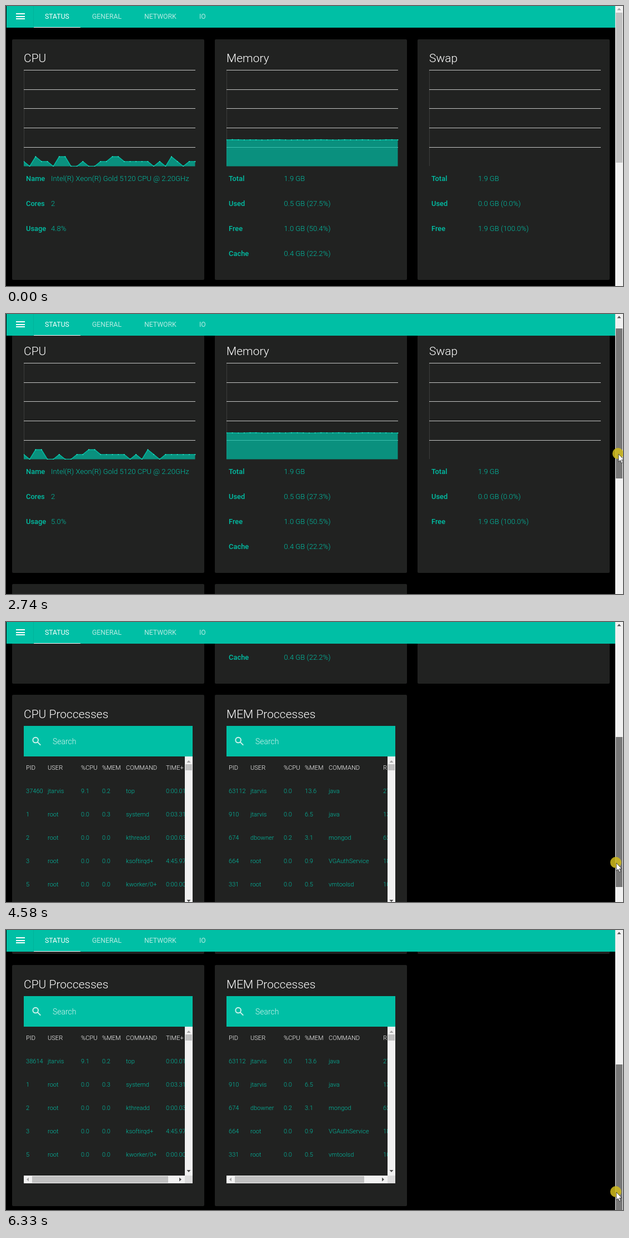
An HTML page that plays this animation: 1111x504 px, repeating every 8000 ms.

```html
<!DOCTYPE html>
<html lang="en">
<head>
<meta charset="utf-8">
<title>Server status</title>
<style>
  html, body { margin: 0; width: 100%; height: 100%; overflow: hidden; background: #000; }
  #stage { position: relative; width: 1111px; height: 504px; overflow: hidden; background: #000;
    font: 300 13.1px/20px Roboto, sans-serif; color: #00bfa5; }
  #stage div, #stage svg, .t { position: absolute; }
  .t { white-space: pre; }
  #page { left: 0; top: 0; width: 1096px; height: 960px; }
  .card { width: 345.5px; height: 433.5px; background: #212221; border-radius: 2px; }
  .title { font-size: 21px; color: #fff; }
  .label { font-weight: 500; font-size: 12.9px; }
  .table { overflow: hidden; font-size: 11.1px; }
  .head { color: #fff; }
  .search { width: 304px; height: 55.5px; background: #00bfa5; }
  .hint { font-size: 14px; color: #d3f3ee; }
  .track { background: #f1f1f1; }
  .thumb { background: #c1c1c1; }
  .grid { stroke: #c4c5c4; shape-rendering: crispEdges; }
  .axis { stroke: #3c3d3c; shape-rendering: crispEdges; }
  .area { fill: #00bfa5; fill-opacity: .7; }
  .line { fill: none; stroke: #00bfa5; stroke-width: 1.4; }
  .dots { fill: none; stroke: #2fdcc0; stroke-width: 2; stroke-linecap: round; }
  #nav { left: 1px; top: 0; width: 1095.5px; height: 39px; background: #00bfa5; }
  #nav .t { font-size: 12.25px; font-weight: 400; color: #b5ebe3; }
  #nav .on { color: #fff; }
  #nav div { background: #fff; }
  #nav .edge { left: 48px; top: 0; width: 1px; height: 39px; background: #00b29a; }
  #bar { left: 1096.5px; top: 0; width: 14.5px; height: 504px; }
  #thumb { left: 1px; width: 12.5px; height: 270px; top: 12px; }
  #halo { width: 20px; height: 20px; margin: -10px; border-radius: 50%; background: rgba(205, 184, 28, .88); }
</style>
</head>
<body>
<div id="stage">
  <div id="page"></div>
  <div id="nav"></div>
  <div id="bar" class="track">
    <div id="thumb"></div>
    <svg width="14" height="12"><path id="up" d="M3.5 7.5 7 3.5 10.5 7.5z"/></svg>
  </div>
  <div id="halo"></div>
  <svg id="cursor" width="14" height="20" viewBox="-1 -1 14 20">
    <path d="M0 0V14L3.2 11.2 5.5 16.4 7.9 15.4 5.6 10.3H9.8Z" fill="#fff" stroke="#111" stroke-width=".7"/>
  </svg>
</div>
<script>
const LOOP = 8000, FIRST = 180, PERIOD = 683.3, LAST = 9;
const POINTS = 30, STEP = 308.5 / (POINTS - 1), BASE = 174.5, SCALE = 1.735;
const THUMB_RATIO = .5106;
const $ = id => document.getElementById(id);

const text = (x, y, s, cls = '', id = '') =>
  `<span class="t ${cls}" ${id && `id="${id}"`} style="left:${x}px;top:${y - 10}px">${s}</span>`;
const box = (x, y, w, h, cls, inner = '') =>
  `<div class="${cls}" style="left:${x}px;top:${y}px;width:${w}px;height:${h}px">${inner}</div>`;
const arrow = (x, y, turn, color) =>
  `<svg width="8" height="8" viewBox="-4 -4 8 8" style="left:${x - 4}px;top:${y - 4}px">
    <path d="M-3.5 2 0-2 3.5 2z" fill="${color}" transform="rotate(${turn})"/></svg>`;

function chart(x, id) {
  let grid = '';
  for (let i = 0; i < 5; i++) {
    const y = Math.round(i * 34.7) + 1.5;
    grid += `<path class="grid" d="M0 ${y}H308.5"/>`;
  }
  return `<svg width="310" height="175" style="left:${x}px;top:114px">
    <path class="axis" d="M.5 1V174"/>${grid}
    <path class="area" id="${id}Area"/><path class="line" id="${id}Line"/><path class="dots" id="${id}Dots"/></svg>`;
}

function statCard(i, title, id, valueX, rows) {
  const x = 32 + 365 * i;
  return `<div class="card" style="left:${x - 21}px;top:59.5px"></div>` +
    text(x, 94, title, 'title') + chart(x, id) +
    rows.map(([name, value, key], r) =>
      text(x + 4, 310.5 + 45 * r, name, 'label') + text(x + valueX, 310.5 + 45 * r, value, '', key)).join('');
}

function processCard(i, title, cols, thumbWidth, rows) {
  const x = 32 + 365 * i, top = 513;
  const cells = rows.map((row, r) => row.split(' ').map((s, c) =>
    text(cols[c], 20.5 + 42.1 * r, s, r ? '' : 'head', !i && r === 1 && !c ? 'pid' : '')).join('')).join('');
  return `<div class="card" style="left:${x - 21}px;top:${top}px"></div>` +
    text(x, top + 34.5, title, 'title') +
    `<div class="search" style="left:${x}px;top:${top + 55.5}px">
      <svg width="20" height="20" style="left:14px;top:18px" fill="none" stroke="#d3f3ee" stroke-width="1.9">
        <circle cx="7.2" cy="7.6" r="4.8"/><path d="M10.8 11.2 16.3 16.7"/></svg>
      ${text(52, 28, 'Search', 'hint')}</div>` +
    box(x, top + 111, 290, 268, 'table', cells) +
    box(x + 289.5, top + 111, 14.5, 268, 'track',
      arrow(7, 8.5, 0, '#a3a3a3') + box(1, 14, 12.5, 10.5, 'thumb') + arrow(7, 260, 180, '#505050')) +
    box(x, top + 378.5, 304, 14.5, 'track',
      arrow(7, 7, -90, '#a3a3a3') + box(14.5, 1, thumbWidth, 12.5, 'thumb') + arrow(282, 7, 90, '#505050') +
      '<div style="right:0;top:0;width:14.5px;height:14.5px;background:#dcdcdc"></div>');
}

$('page').innerHTML =
  statCard(0, 'CPU', 'cpu', 49, [
    ['Name', 'Intel(R) Xeon(R) Gold 5120 CPU @ 2.20GHz'], ['Cores', '2'], ['Usage', '', 'usage']]) +
  statCard(1, 'Memory', 'mem', 103.5, [
    ['Total', '1.9 GB'], ['Used', '', 'used'], ['Free', '', 'free'], ['Cache', '0.4 GB (22.2%)']]) +
  statCard(2, 'Swap', 'swap', 88, [
    ['Total', '1.9 GB'], ['Used', '0.0 GB (0.0%)'], ['Free', '1.9 GB (100.0%)']]) +
  processCard(0, 'CPU Proccesses', [4, 43, 103, 141, 184, 256], 245, [
    'PID USER %CPU %MEM COMMAND TIME+',
    '37002 jtarvis 9.1 0.2 top 0:00.01',
    '1 root 0.0 0.3 systemd 0:03.31',
    '2 root 0.0 0.0 kthreadd 0:00.03',
    '3 root 0.0 0.0 ksoftirqd+ 4:45.97',
    '5 root 0.0 0.0 kworker/0+ 0:00.00']) +
  processCard(1, 'MEM Proccesses', [4, 43, 103, 141, 184, 282], 233.5, [
    'PID USER %CPU %MEM COMMAND RES',
    '63112 jtarvis 0.0 13.6 java 272m',
    '910 jtarvis 0.0 6.5 java 130m',
    '674 dbowner 0.2 3.1 mongod 62m',
    '664 root 0.0 0.9 VGAuthService 18m',
    '331 root 0.0 0.5 vmtoolsd 10m']);

$('nav').innerHTML = '<div class="edge"></div>' +
  [12.5, 17.5, 22].map(y => `<div style="left:17px;top:${y}px;width:15.5px;height:2px"></div>`).join('') +
  text(69, 18.5, 'STATUS', 'on') + text(154, 18.5, 'GENERAL') +
  text(248, 18.5, 'NETWORK') + text(347, 18.5, 'IO') +
  '<div style="left:48.5px;top:37.5px;width:84.5px;height:1.5px"></div>';

// Load history in steps of about five percent, one new sample per update.
const load = [...'102110220010011221111101021011' + '111101110'].map(n => n * 4.95);
const memory = i => 27.4 + .2 * Math.sin(i * 1.3) * Math.cos(i * .37);
const usedShare = [27.5, 27.4, 27.2, 27.3], freeShare = [50.4, 50.4, 50.6, 50.5];
const pids = [37002, 37460, 37920, 38270, 38614];

function plot(id, value) {
  const pts = Array.from({ length: POINTS }, (_, i) =>
    `${(i * STEP).toFixed(1)} ${(BASE - value(i) * SCALE).toFixed(1)}`);
  $(id + 'Area').setAttribute('d', `M0 ${BASE}L${pts.join('L')}V${BASE}Z`);
  $(id + 'Line').setAttribute('d', 'M' + pts.join('L'));
  $(id + 'Dots').setAttribute('d', pts.map(p => `M${p}h.01`).join(''));
}

let shown = -1;
function update(k) {
  if (k === shown) return;
  shown = k;
  plot('cpu', i => load[i + k] ?? 4.95);
  plot('mem', i => memory(i + k));
  const m = Math.min(k, 3);
  $('usage').textContent = k === 0 ? '4.8%' : k === 5 ? '0.0%' : '5.0%';
  $('used').textContent = `0.5 GB (${usedShare[m].toFixed(1)}%)`;
  $('free').textContent = `1.0 GB (${freeShare[m].toFixed(1)}%)`;
  $('pid').textContent = pids[Math.max(0, Math.min(k - 6, 4))];
}

// Tracks are lists of [time, value, ...]; values are joined by straight lines.
const scrollTrack = [[2500, 0], [2740, 26.4], [3160, 135], [3370, 135], [3790, 243], [3960, 243], [4030, 253],
  [4710, 412], [4840, 412], [5200, 426], [5340, 441], [5590, 441], [5900, 455], [6100, 450.4]];
const pointerTrack = [[180, 1030, 500], [420, 1049, 363], [660, 1049, 363], [890, 1074, 290], [1050, 1074, 290],
  [1220, 1085, 264], [1750, 1096, 254], [1870, 1097, 253], [2050, 1101, 251], [2280, 1102, 237.5 + 13],
  [2500, 1102, 237.5], [2740, 1102, 237.5], [3160, 1100, 235.5], [4030, 1098, 240], [5200, 1098, 235.5], [6100, 1098, 241]];
pointerTrack.find(p => p[0] === 2280)[2] = 237.5;

function at(track, t) {
  const n = track.findIndex(p => p[0] > t);
  if (n === 0) return track[0].slice(1);
  if (n < 0) return track[track.length - 1].slice(1);
  const a = track[n - 1], b = track[n], f = (t - a[0]) / (b[0] - a[0]);
  return a.slice(1).map((v, i) => v + (b[i + 1] - v) * f);
}

const start = performance.now();
function draw(now) {
  const t = Math.max(0, now - start) % LOOP;
  update(Math.max(0, Math.min(LAST + 1, Math.floor((t - FIRST) / PERIOD) + 1)));

  const scroll = at(scrollTrack, t)[0], shift = scroll * THUMB_RATIO;
  $('page').style.transform = `translateY(${-Math.round(scroll)}px)`;
  $('thumb').style.top = 12 + shift + 'px';
  $('thumb').style.background = t < 1900 ? '#c1c1c1' : t < 2270 ? '#a8a8a8' : '#787878';
  $('up').setAttribute('fill', scroll > 0 ? '#505050' : '#a3a3a3');

  const [x, y] = at(pointerTrack, t), place = `translate(${x}px, ${y + shift}px)`;
  $('halo').style.transform = place;
  $('halo').style.visibility = t < 2270 ? 'hidden' : 'visible';
  $('cursor').style.transform = place;
  $('cursor').style.visibility = t < FIRST ? 'hidden' : 'visible';
  requestAnimationFrame(draw);
}
draw(start);
</script>
</body>
</html>
```
